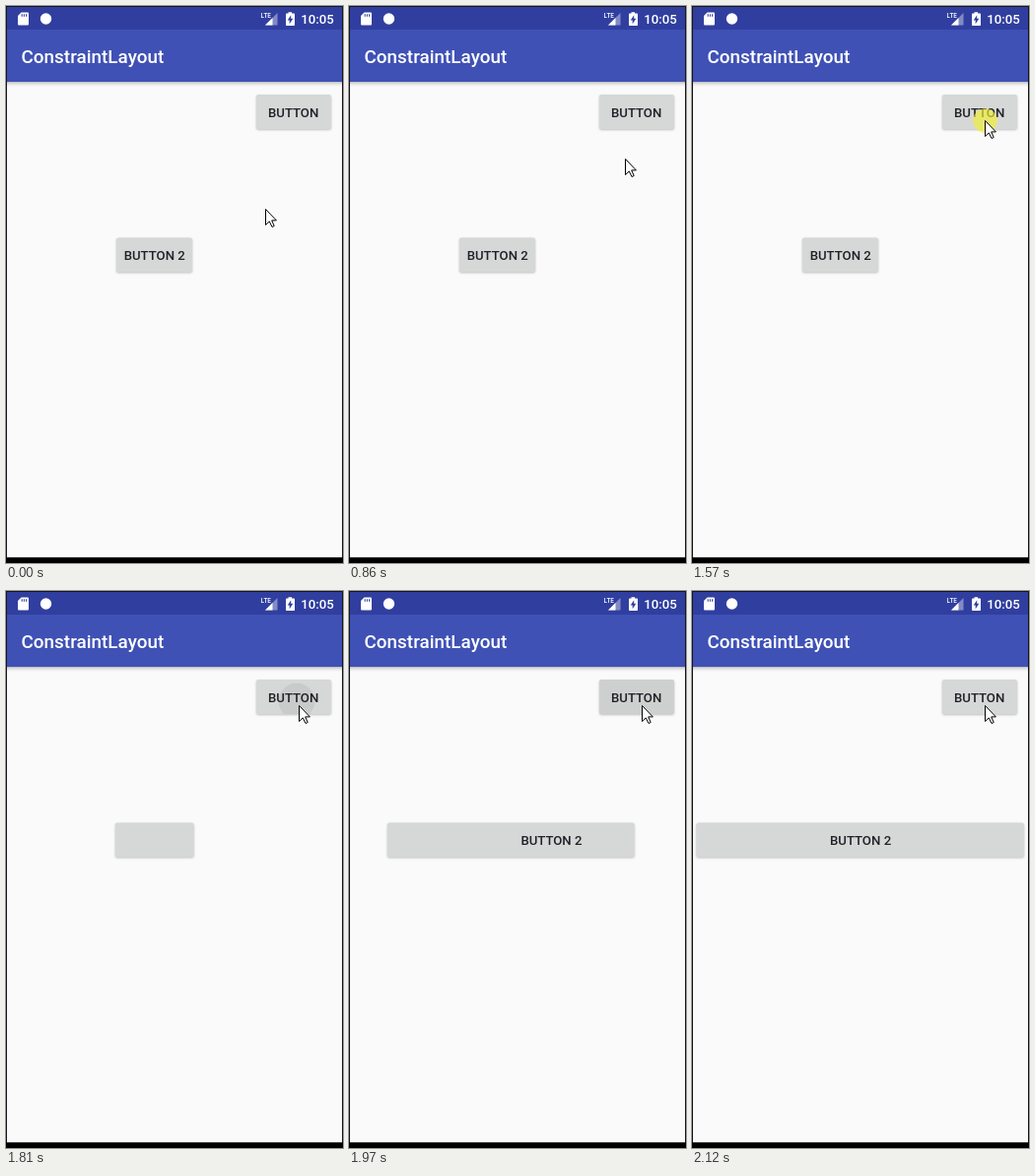
These frames come from a looping animation (342 by 566 pixels, 3.45 s). An HTML page:

```html
<!DOCTYPE html>
<html lang="en">
<head>
<meta charset="utf-8">
<title>ConstraintLayout</title>
<style>
  html, body { margin: 0; width: 100%; height: 100%; overflow: hidden; background: #fafafa; }
  svg { display: block; }
  text { font-family: Roboto, sans-serif; font-weight: 500; }
  .label { font-size: 13.2px; fill: #212128; }
  .raised { fill: #d6d8d7; filter: drop-shadow(0 1px 1px rgba(0, 0, 0, .24)); }
</style>
</head>
<body>
<svg width="342" height="566" viewBox="0 0 342 566">
  <defs>
    <linearGradient id="shade" x1="0" y1="0" x2="0" y2="1">
      <stop offset="0" stop-color="#000" stop-opacity=".26"/>
      <stop offset=".4" stop-color="#000" stop-opacity=".09"/>
      <stop offset="1" stop-color="#000" stop-opacity="0"/>
    </linearGradient>
    <clipPath id="face"><rect x="254" y="90" width="76" height="35" rx="2"/></clipPath>
  </defs>

  <rect width="342" height="566" fill="#fafafa"/>
  <rect y="77" width="342" height="5" fill="url(#shade)"/>
  <rect width="342" height="25" fill="#303f9f"/>
  <rect y="24" width="342" height="53" fill="#3f51b5"/>
  <text x="15.5" y="58" font-size="18.9" fill="#fff">ConstraintLayout</text>

  <!-- status bar -->
  <g fill="#fff">
    <path d="M15.5 6.5H22a1 1 0 0 1 1 1V18.5a1 1 0 0 1-1 1H13a1 1 0 0 1-1-1V10z"/>
    <path d="M16.2 8.2v2.6M18.4 8.2v2.6M20.6 8.2v2.6" stroke="#303f9f" stroke-width="1.1"/>
    <circle cx="40.5" cy="13" r="5.7"/>
    <path d="M275.5 7V19.5H263z" opacity=".4"/>
    <path d="M270.5 12V19.5H263z"/>
    <text x="258.6" y="11.8" font-size="6.4">LTE</text>
    <path d="M286.5 7.5V6.3h3.6v1.2h2.1a.8.8 0 0 1 .8.8V19.2a.8.8 0 0 1-.8.8H284.8a.8.8 0 0 1-.8-.8V8.3a.8.8 0 0 1 .8-.8z"/>
    <path d="M289.2 9.3V12.8h2.1l-3.6 5.5v-3.8h-2z" fill="#303f9f"/>
    <text x="299.3" y="18" font-size="13.2">10:05</text>
  </g>

  <rect class="raised" x="254" y="90" width="76" height="35" rx="2"/>
  <g clip-path="url(#face)"><circle id="ripple" cx="295" cy="112" r="0"/></g>
  <text class="label" x="266" y="112.5">BUTTON</text>

  <rect class="raised" id="bar" y="235.5" height="34.8" rx="2"/>
  <svg id="pane" y="235" height="36"><text class="label" id="caption" y="23">BUTTON 2</text></svg>

  <circle id="press" cx="297.5" cy="116.5" r="12.3" fill="#f0f032" opacity=".66"/>
  <path id="cursor" d="M.5 .5V16.5L4.3 12.9L7 18.5L9.2 17.5L6.7 11.9H11.4Z" fill="#fff" stroke="#000"/>

  <path d="M0 0H342V566H0zM1 1V560.5H341V1z" fill="#16161c" fill-rule="evenodd"/>
  <rect y="560.5" width="342" height="5.5" fill="#000"/>
</svg>
<script>
const LOOP = 3450;
const TICKS = [1730, 1810, 1880, 1970, 2050, 2120];
const $ = id => document.getElementById(id);
const clamp = v => Math.min(1, Math.max(0, v));
const mix = (a, b, p) => a + (b - a) * p;

function set(id, attrs) {
  for (const key in attrs) $(id).setAttribute(key, attrs[key]);
}

function movePointer(t) {
  const p = t < 620 ? 0 : Math.min(7, Math.floor((t - 620) / 80) + 1) / 7;
  const x = Math.round(mix(263, 297, p ** 1.2));
  const y = Math.round(mix(206, 116, p));
  set('cursor', { transform: `translate(${x} ${y})` });
  set('press', { visibility: t >= 1570 && t < 1730 ? 'visible' : 'hidden' });
}

function widen(t) {
  const p = (1 - Math.cos(Math.PI * clamp((t - 1791) / 290))) / 2;
  const left = mix(112, 4.5, p);
  const width = mix(189, 337, p) - left;
  set('bar', { x: left, width });
  set('pane', { x: left, width });
  // the label takes its final offset as soon as the layout changes
  set('caption', { x: t < 1791 ? 7.7 : 135.5 });
}

function spread(t) {
  const r = t < 1730 ? 0 : 8 + (t - 1730) * 0.13;
  const fade = t < 1810 ? 0.06 : mix(0.06, 0.035, clamp((t - 1810) / 160));
  set('ripple', {
    r: t < 1880 ? r : r * 2,
    opacity: fade * (1 - clamp((t - 1970) / 150))
  });
}

function draw(t) {
  const held = TICKS.filter(v => v <= t).pop() || 0;
  movePointer(t);
  widen(held);
  spread(held);
}

const start = performance.now();
function frame() {
  draw((performance.now() - start) % LOOP);
  requestAnimationFrame(frame);
}
frame();
</script>
</body>
</html>
```
